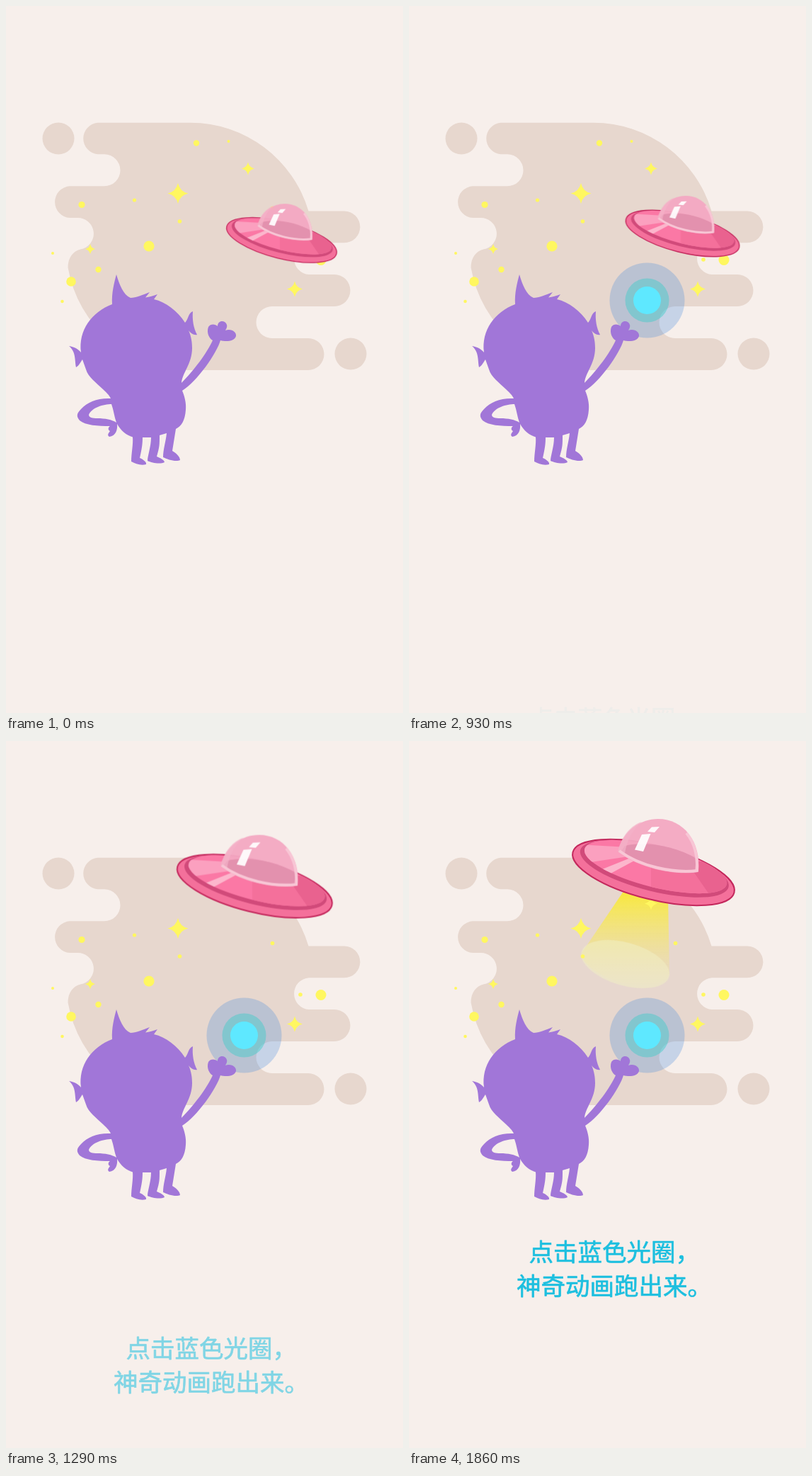
Recreate the animation shown at these times as an HTML page. Size 561 by 998 pixels, loop 1.89 s.

```html
<!DOCTYPE html>
<html lang="zh">
<head>
<meta charset="utf-8">
<title>UFO</title>
<style>
html, body { margin: 0; width: 100%; height: 100%; overflow: hidden; background: #f7efeb; }
svg { display: block; width: 100%; height: 100%; }

/* 1890 ms loop, drawn in 30 ms steps */
.orb, .halo, .ufo, .beam, .pool, .caption {
  animation: 1890ms linear -1ms infinite both;
}
.orb { animation-name: orb-move, orb-fade; }
.halo { animation-name: halo; }
.ufo { animation-name: ufo; transform-origin: 345.5px 171.5px; }
.beam { animation-name: beam; }
.pool { animation-name: pool; }
.caption {
  animation-name: caption;
  font: 500 34.5px "Noto Sans CJK SC", "Noto Sans CJK", "Noto Sans SC", sans-serif;
  fill: #1dbfdf; stroke: #1dbfdf; stroke-width: .7; stroke-linejoin: round;
}

@keyframes orb-move {
  0% { transform: translate(305px, 452px) scale(.2); animation-timing-function: steps(19); }
  30.1587%, 100% { transform: translate(336.5px, 415.5px) scale(1); }
}
@keyframes orb-fade {
  0% { opacity: 0; }
  12% { opacity: .5; }
  30.1587%, 100% { opacity: 0; }
}
@keyframes halo {
  0% { opacity: 0; }
  31.746% { opacity: 0; animation-timing-function: steps(10); }
  47.619%, 100% { opacity: 1; }
}
@keyframes ufo {
  0% { transform: translate(44px, 149.5px) scale(.68); }
  47.619% { transform: translate(44px, 149.5px) scale(.68); animation-timing-function: steps(15); }
  71.4286%, 100% { transform: translate(0, 0) scale(1); }
}
@keyframes caption {
  0% { transform: translateY(297px); opacity: 0; }
  47.619% { transform: translateY(297px); opacity: 0; animation-timing-function: steps(24); }
  85.7143%, 100% { transform: translateY(0); opacity: 1; }
}
@keyframes beam {
  0% { opacity: 0; }
  71.4286% { opacity: 0; animation-timing-function: steps(10); }
  87.3016%, 100% { opacity: 1; }
}
@keyframes pool {
  0% { opacity: 0; }
  87.3016% { opacity: 0; animation-timing-function: steps(7); }
  98.4127%, 100% { opacity: 1; }
}
</style>
</head>
<body>
<svg viewBox="0 0 561 998">
  <defs>
    <linearGradient id="glow" gradientUnits="userSpaceOnUse" x1="0" y1="212" x2="0" y2="347">
      <stop offset="0" stop-color="#f8e83c"/>
      <stop offset="1" stop-color="#f8ec70" stop-opacity="0"/>
    </linearGradient>
    <clipPath id="face">
      <ellipse cx="1" cy="-8.5" rx="103.500" ry="29" transform="translate(345.5 185.5) rotate(14)"/>
    </clipPath>
    <path id="star" d="M0-1Q.18-.18 1 0Q.18 .18 0 1Q-.18 .18-1 0Q-.18-.18 0-1Z"/>
  </defs>

  <!-- cloud -->
  <g fill="#e7d7ce">
    <path d="M129.5 164.7H261A174.5 174.5 0 0 1 427.5 289.5H478A22.4 22.4 0 0 1 478 334.3H428
      A22.4 22.4 0 0 0 428 379H464A22.4 22.4 0 0 1 464 424H376A22.5 22.5 0 0 0 376 469H427
      A22.5 22.5 0 0 1 427 514H261A174.5 174.5 0 0 1 87.5 369C87.5 355 95 346 105 343.5
      A22.4 22.4 0 0 0 100.5 299H90A22.4 22.4 0 0 1 90 254.3H139A22.4 22.4 0 0 0 139 209.3H129.5
      A22.4 22.4 0 0 1 129.5 164.7Z"/>
    <circle cx="74" cy="187" r="22.5"/>
    <circle cx="487" cy="491" r="22.5"/>
  </g>

  <g class="beam">
    <path fill="url(#glow)" d="M308 205L366 218L368 328A64.4 30.2 16 0 1 243.5 300Z"/>
  </g>
  <g class="pool">
    <ellipse rx="64.4" ry="30.2" transform="translate(305.7 315) rotate(16)" fill="#f0eec4" fill-opacity=".55"/>
  </g>

  <g id="sky" fill="#fff760"></g>

  <g class="halo">
    <circle cx="336.5" cy="415.5" r="53" fill="#488ddd" fill-opacity=".28"/>
    <circle cx="336.5" cy="415.5" r="31" fill="#3ccdc8" fill-opacity=".45"/>
    <circle cx="336.5" cy="415.5" r="19.5" fill="#5ee8ff"/>
  </g>
  <g class="orb">
    <circle r="31" fill="#5ee8ff" fill-opacity=".6"/>
  </g>

  <!-- monster -->
  <path fill="#a176d8" fill-rule="evenodd" d="M150 421C149 405 153 390 156 379C160 393 166 408 176 412C184 412 192 408 203 404
    L197 411.5C203 411 208 409 214 407L209 414C226 418 242 430 253 447C258 442 257 434 264 431C263 443 265 455 270 464
    C266 465 261 462 258 458C262 467 263 475 263 483C263 505 249 518 248 532C265 515 284 490 292 472
    C287 469 283 461 286 453C289 448 296 449 299 452C299 443 310 443 312 450C313 453 311 456 310 458
    C318 455 326 460 325 466C323 474 310 474 303 472C298 490 270 530 249 543C252 550 255 560 254 570
    C253 585 248 593 240 597L235 628C240 631 246 636 246 641C240 644 228 640 222 637C222 626 226 614 227 603
    C224 604 220 605 217 606C217 620 217 622 213 636C218 638 224 641 224 644C218 647 206 645 200 642
    C200 635 205 622 205 609H193C193 618 192 625 189 638C194 640 199 644 198 647C190 649 183 646 177 643
    C177 632 180 618 179 608.5C170 606 162 599 157 590C158 598 155 607 146 608C143 606 144 604 147 600
    C143 598 145 594 147 593C130 593 112 592 104 585C99 579 100 575 106 569C115 559 130 553 148 554
    C146 549 141 545 137 541C128 532 116 524 113 513L108 499C105 503 103 508 99 510C97 500 99 488 89 480
    C96 481 102 484 106 489C102 458 121 432 150 421Z
    M149 562C138 562 121 567 117 577C117 581 122 582 129 582C140 582 150 584 156 588C153 580 152 570 149 562Z"/>

  <g class="ufo">
    <g transform="translate(345.5 185.5) rotate(14)">
      <ellipse rx="117.5" ry="38.2" fill="#f4709b" stroke="#c3285c" stroke-width="2"/>
      <ellipse cy="-5.500" rx="108" ry="32" fill="#d14a7a"/>
    </g>
    <g clip-path="url(#face)">
      <path fill="#fb78a5" d="M220 120H470V240H220Z"/>
      <path fill="#f4709b" d="M342 170V240H440L390 165Z"/>
      <path fill="#e9628f" d="M392 170L437 235L475 225L455 170Z"/>
      <path fill="#fba0bf" d="M310 150L240 146L250 172L310 163Z"/>
      <path fill="#fcb6cc" d="M318 163L258 187L270 195L322 167Z"/>
    </g>
    <path fill="#f4a8c2" fill-opacity=".95" d="M295 156C303 126 327 110 352 110C388 110 413 142 409 185C375 190 325 180 295 156Z"/>
    <path fill="#e391ae" d="M305 148C330 141 376 147 406 166L404 182C375 186 330 176 300 155Z"/>
    <path fill="#f4b2c8" fill-opacity=".7" d="M295 156C301 133 314 119 329 114C316 125 308 140 305 158Z"/>
    <path fill="none" stroke="#f8c6d5" stroke-width="4" stroke-linejoin="round"
      d="M297 155C326 177 374 187 407 183C408 160 403 143 392 130"/>
    <path fill="#fff" fill-opacity=".92" d="M329 132L341.5 131L331 156L319 153.5ZM343 121.5L354 121L347 129L337 128Z"/>
  </g>

  <g class="caption">
    <text x="169.5" y="734">点击蓝色光圈，</text>
    <text x="152" y="782">神奇动画跑出来。</text>
  </g>
</svg>
<script>
const sky = document.getElementById('sky');
const dots = [
  [269, 193.5, 4.2], [314.5, 191, 2], [107, 280.5, 4.6], [181.5, 274, 2.6], [245.5, 304, 2.8],
  [202, 339, 7.6], [130.5, 372, 4.2], [92, 389, 6.8], [79.5, 417, 2.3], [66, 349, 2],
  [376.5, 285.5, 2.8], [416, 358, 2.8], [445, 358.5, 7.5]
];
const stars = [[243, 264.5, 14.5], [342, 229.5, 9], [119, 343, 7], [408, 399.5, 11]];

function add(tag, attrs) {
  const el = document.createElementNS('http://www.w3.org/2000/svg', tag);
  for (const key in attrs) el.setAttribute(key, attrs[key]);
  sky.append(el);
}
for (const [cx, cy, r] of dots) add('circle', { cx, cy, r });
for (const [x, y, r] of stars) add('use', { href: '#star', transform: `translate(${x} ${y}) scale(${r})` });
</script>
</body>
</html>
```
